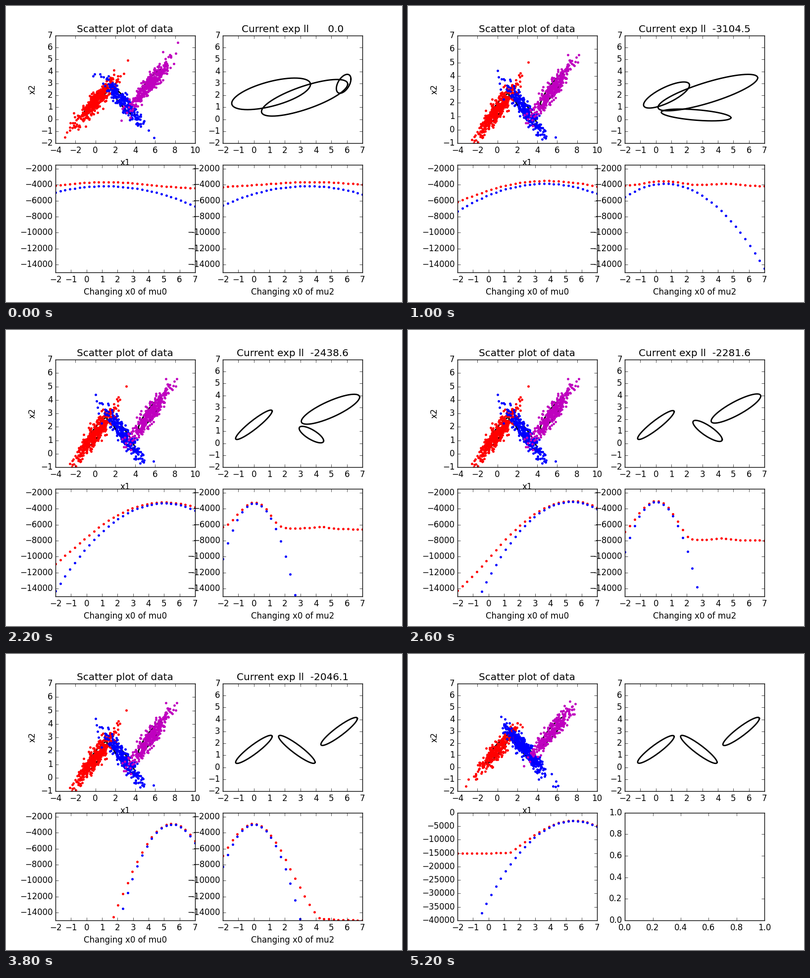
These frames come from a looping animation (800 by 600 pixels, 5.4 s). A matplotlib script:

```python
import numpy as np
import matplotlib.pyplot as plt
from matplotlib.animation import FuncAnimation

plt.style.use("classic")
plt.rcParams["font.family"] = "DejaVu Sans"

FRAMES, STEP = 27, 200
SCALE = np.sqrt(2 * np.log(2))  # ellipses enclose half of the mass
SHIFTS = np.linspace(-2, 7, 30)
THETA = np.linspace(0, 2 * np.pi, 200)

# Every ellipse: centre x, centre y, half width, half height, correlation
CLUSTERS = [(0, 1.5, SCALE, SCALE, .92),
            (2.77, 1.5, SCALE, SCALE, -.92),
            (5.5, 3, SCALE, SCALE, .92)]


def sample(seed, *counts):
    rng = np.random.default_rng(seed)
    groups = []
    for (cx, cy, w, h, rho), n in zip(CLUSTERS, counts):
        z = rng.standard_normal((2, n))
        u, v = (z - z.mean(1, keepdims=True)) / z.std(1, keepdims=True)
        y = rho * u + np.sqrt(1 - rho**2) * v
        groups.append(np.column_stack([cx + w / SCALE * u, cy + h / SCALE * y]))
    return groups


def moments(pts):
    return (*pts.mean(0), *(SCALE * pts.std(0)), np.corrcoef(pts.T)[0, 1])


def log_density(pts, e):
    cx, cy, w, h, rho = e
    u, v = SCALE * (pts[:, 0] - cx) / w, SCALE * (pts[:, 1] - cy) / h
    rest = 1 - rho**2
    norm = 2 * np.pi * w * h / SCALE**2 * np.sqrt(rest)
    return -(u * u - 2 * rho * u * v + v * v) / (2 * rest) - np.log(norm)


def likelihood_curves(groups, ellipses, k):
    """Mixture and expected log likelihood while component k slides along x."""
    pts = np.vstack(groups)
    logs = np.array([log_density(pts, e) for e in ellipses])
    weights = np.full(len(logs), 1 / len(logs))
    for _ in range(5):
        joint = logs + np.log(weights)[:, None]
        resp = np.exp(joint - np.logaddexp.reduce(joint))
        weights = resp.mean(1) + 1e-9
    joint = logs + np.log(weights)[:, None]
    mixture, expected = [], []
    for x in SHIFTS:
        joint[k] = log_density(pts, (x, *ellipses[k][1:])) + np.log(weights[k])
        mixture.append(np.logaddexp.reduce(joint).sum())
        expected.append((resp * joint).sum())
    return mixture, expected


FIRST = sample(3, 400, 230, 370)
MAIN = sample(8, 420, 250, 330)
THIRD = sample(15, 280, 410, 310)
LAST = sample(21, 300, 400, 300)

START = [(1.11, 2.13, 2.54, 1.32, .6),
         (3.27, 1.8, 2.78, 1.53, .75),
         (5.79, 2.97, .47, .79, .5)]
STUCK = [moments(np.vstack(THIRD[1:])), moments(THIRD[0]), (.63, 2.33, .1, .11, -.95)]
DONE = [moments(g) for g in LAST[::-1]]

# Main run: step, printed likelihood, ellipses
KEYS = [
    (2, -3329.6, [(2.74, 2.05, 3.4, 1.51, .8),
                  (1.49, 2.44, 2.07, 1, .5),
                  (1.1, .25, 3.14, .38, -.4)]),
    (7, -2954.5, [(3.76, 2.36, 3.09, 1.53, .81),
                  (.15, 1.76, 1.09, 1.15, .92),
                  (3.59, .44, 1.65, .57, -.5)]),
    (11, -2438.6, [(4.94, 2.85, 1.88, 1.25, .81),
                   (0, 1.55, 1.18, 1.23, .93),
                   (3.71, .73, .79, .69, -.75)]),
    (16, -2046.1, [moments(MAIN[j]) for j in (2, 0, 1)]),
]


def main_run(i):
    i = min(i, KEYS[-1][0])
    for (a, ll_a, p), (b, ll_b, q) in zip(KEYS, KEYS[1:]):
        if i <= b:
            t = (i - a) / (b - a)
            p, q = np.array(p), np.array(q)
            return p + (q - p) * t, ll_a + (ll_b - ll_a) * t


def scene(i):
    """Data, its y limits, fitted ellipses and printed likelihood."""
    if i < 1:
        return FIRST, (-2, 7), START, 0
    if i < 20:
        return MAIN, (-1, 7), *main_run(i)
    if i < 25:
        return THIRD, (-2, 6), STUCK, -2883.8
    return LAST, (-2, 7), DONE, None


def set_frame(ax, xlim, xstep, ylim, ystep, ystart=None):
    ystart = ylim[0] if ystart is None else ystart
    ax.set_xticks(np.arange(xlim[0], xlim[1] + xstep / 2, xstep))
    ax.set_yticks(np.arange(ystart, ylim[1] + ystep / 1000, ystep))
    ax.set_xlim(xlim)
    ax.set_ylim(ylim)


def draw_ellipse(ax, e):
    cx, cy, w, h, rho = e
    y = rho * np.cos(THETA) + np.sqrt(1 - rho**2) * np.sin(THETA)
    ax.plot(cx + w * np.cos(THETA), cy + h * y, "k", lw=2)


fig, axes = plt.subplots(2, 2, figsize=(8, 6), dpi=100, facecolor="white")
fig.subplots_adjust(left=.125, right=.9, bottom=.1, top=.9, wspace=.2, hspace=.2)
(scatter, fit), lower = axes


def draw(i):
    groups, ylim, ellipses, ll = scene(i)
    for ax in axes.flat:
        ax.clear()

    for e in CLUSTERS:
        draw_ellipse(scatter, e)
    for pts, color in zip(groups, "rbm"):
        scatter.plot(*pts.T, color + ".")
    set_frame(scatter, (-4, 10), 2, ylim, 1)
    scatter.set_title("Scatter plot of data")
    scatter.set_xlabel("x1")
    scatter.set_ylabel("x2")

    for e in ellipses:
        draw_ellipse(fit, e)
    set_frame(fit, (-2, 7), 1, (-2, 7), 1)
    if ll is not None:
        fit.set_title("Current exp ll %8.1f" % ll)

    two_curves = i < 20
    for k, ax in enumerate(lower):
        if k and not two_curves:
            set_frame(ax, (0, 1), .2, (0, 1), .2)
            continue
        mixture, expected = likelihood_curves(groups, ellipses, k)
        ax.plot(SHIFTS, mixture, "r.")
        ax.plot(SHIFTS, expected, "b.")
        if ll is None:
            set_frame(ax, (-2, 7), 1, (-40000, 0), 5000)
        else:
            set_frame(ax, (-2, 7), 1, (-15000, -1500), 2000, -14000)
        if two_curves:
            ax.set_xlabel("Changing x0 of mu%d" % (2 * k), labelpad=5.7)
    return []


anim = FuncAnimation(fig, draw, frames=FRAMES, init_func=lambda: draw(0),
                     interval=STEP, repeat=True, repeat_delay=0)
plt.show()
```
